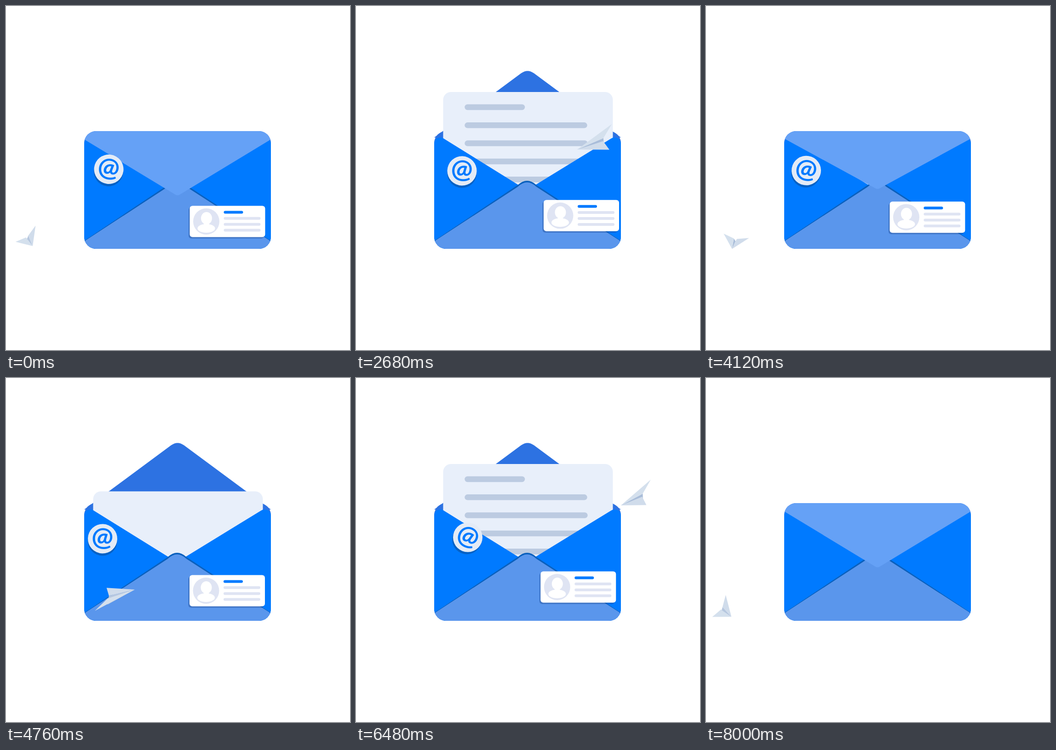
Animation of 748 by 748 pixels, one loop 8.04 s. Source, as an HTML page:

```html
<!DOCTYPE html>
<html lang="en">
<head>
<meta charset="utf-8">
<title>Mail</title>
<style>
  html, body { margin: 0; width: 100%; height: 100%; overflow: hidden; background: #fff; }
  svg { display: block; width: 100%; height: 100%; }
</style>
</head>
<body>
<svg viewBox="0 0 748 748">
  <defs>
    <clipPath id="body"><rect x="170" y="272" width="406" height="256" rx="26"/></clipPath>
    <clipPath id="portrait"><circle cx="36" cy="34" r="28.5"/></clipPath>
  </defs>
  <rect x="170" y="272" width="406" height="256" rx="26" fill="#2d72e2"/>
  <path id="flapUp" fill="#2d72e2"/>
  <g id="letter">
    <rect x="189.5" width="369" height="232" rx="17" fill="#e8effa"/>
    <g id="lines" stroke="#bccbe1" stroke-width="12.5" stroke-linecap="round"></g>
  </g>
  <g clip-path="url(#body)">
    <path fill="#007aff" d="M170 300Q170 287 182 286Q187 285 192 289L353 389L372 402L391 388.500L555 288Q560 285 565 286Q576 288 576 300V528H170Z"/>
    <path fill="#0a60bd" d="M168 512L352 389Q372 371 392 389L578 512Z"/>
    <path fill="#5a96ec" d="M168 513L352 393Q372 374 392 393L578 513V530H168Z"/>
    <path id="flapDown" fill="#65a1f6"/>
  </g>
  <g id="badges">
    <g id="stamp">
      <circle cy="5" r="32" fill="#0561c5"/>
      <circle r="32" fill="#e4ebf6"/>
      <text id="at" fill="#007aff">@</text>
    </g>
    <g id="card">
      <rect x="-2.5" y="3" width="164" height="68" rx="6" fill="#00286e" opacity=".3"/>
      <rect width="164" height="68" rx="6" fill="#fff"/>
      <circle cx="36" cy="34" r="28.5" fill="#dfe4f3"/>
      <g clip-path="url(#portrait)" fill="#fff">
        <ellipse cx="36.5" cy="27" rx="12" ry="13.5"/>
        <rect x="31" y="34" width="11" height="10"/>
        <ellipse cx="36" cy="49" rx="19" ry="9.5"/>
      </g>
      <rect x="74" y="11" width="42" height="6" rx="3" fill="#007aff"/>
      <path stroke="#dfe4f3" stroke-width="6" stroke-linecap="round" d="M77 27.300h74M77 40.200h74M77 53.100h74"/>
    </g>
  </g>
  <g id="plane">
    <path fill="#a9bdd9"/>
    <path fill="#b6c7df"/>
    <path fill="#d4e0ed"/>
    <path fill="#d0dceb"/>
  </g>
</svg>
<script>
const STEP = 40, LOOP = 8040, CYCLE = 100;
const $ = id => document.getElementById(id);
const clamp = x => Math.min(1, Math.max(0, x));
const ramp = (n, start, length) => clamp((n - start) / length);
const ease = x => (1 - Math.cos(Math.PI * x)) / 2;
const mix = (a, b, k) => a + (b - a) * k;

// Smooth periodic curve through keys of the form [time, ...values].
function follow(keys, period, n) {
  n = (n + period) % period;
  const count = keys.length;
  const key = i => keys[(i + count) % count];
  const time = i => key(i)[0] + period * Math.floor(i / count);
  let i = count - 1;
  while (i > 0 && keys[i][0] > n) i--;
  const span = time(i + 1) - time(i), u = (n - time(i)) / span;
  const slope = (j, v) => (key(j + 1)[v] - key(j - 1)[v]) / (time(j + 1) - time(j - 1));
  return key(i).slice(1).map((a, k) => {
    const v = k + 1, b = key(i + 1)[v];
    return a * (1 + 2 * u) * (1 - u) ** 2 + b * u * u * (3 - 2 * u)
      + span * (slope(i, v) * u * (1 - u) ** 2 - slope(i + 1, v) * u * u * (1 - u));
  });
}

// time, nose x, nose y, angle from heading to left wing
const flight = [
  [0, 58, 522, -99], [4, 63, 527, -95], [11, 160, 468, -60], [18, 280, 460, -47],
  [27, 467, 379, -97], [48, 688, 222, -85], [54, 655, 230, -60], [61, 576, 277, -55],
  [66, 481, 312, -64], [85, 123, 448, -130], [96, 51, 507, -102]
];
// time, x, y, angle
const stampDrift = [
  [0, 223.5, 355, 7], [27, 236.5, 360, 12], [66, 230.5, 358.5, 2],
  [85, 231.5, 366, 18], [118, 210, 349.5, 2], [161, 243, 346.5, 22]
];
// time, x, y
const cardDrift = [
  [0, 399.5, 434.5], [27, 400.3, 427], [66, 408, 421.8],
  [85, 401.3, 420.5], [118, 399, 428.5], [161, 401.3, 420.5]
];

const rows = [361, 496.5, 497.5, 497.5, 497.5].map((end, i) => {
  const el = document.createElementNS("http://www.w3.org/2000/svg", "line");
  const x = 242.5, y = 33 + 39.3 * i;
  for (const [name, value] of Object.entries({ x1: x, y1: y, y2: y })) el.setAttribute(name, value);
  $("lines").append(el);
  return { el, x, end, start: 18.4 + 4.15 * i };
});

// Centre the sign by its ink, not by its line box.
function centreSign() {
  const font = "700 56px Lato, sans-serif";
  const pen = document.createElement("canvas").getContext("2d");
  pen.font = font;
  const ink = pen.measureText("@");
  $("at").style.font = font;
  $("at").setAttribute("x", (ink.actualBoundingBoxLeft - ink.actualBoundingBoxRight) / 2);
  $("at").setAttribute("y", (ink.actualBoundingBoxAscent - ink.actualBoundingBoxDescent) / 2);
}

// The flap turns about the top edge: 1 is fully open, -1 is shut.
function drawFlap(n) {
  const fold = 2 * (ease(ramp(n, 0, 14)) - ease(ramp(n, 82.7, 15.4))) - 1;
  const up = fold > 0;
  const tip = 272 - fold * (up ? 136 : 141);
  const base = 272 + Math.abs(fold) * (up ? 14 : 18);
  const r = up ? 14 : 5;
  const shoulder = mix(tip, base, r / 203);
  const point = `L${373 - r} ${shoulder}Q373 ${tip} ${373 + r} ${shoulder}`;
  $("flapUp").setAttribute("d", up ? `M170 ${base}${point}L576 ${base}Z` : "");
  $("flapDown").setAttribute("d", up ? "" : `M576 272H170V${base}${point}L576 ${base}Z`);
}

function drawLetter(n) {
  const out = ease(ramp(n, 11.4, 16.5)) - ease(ramp(n, 70.4, 16.5));
  $("letter").setAttribute("transform", `translate(0 ${mix(278, 187, out)})`);
  for (const { el, x, end, start } of rows) {
    const k = ramp(n, start, 4);
    el.setAttribute("x2", mix(x, end, k));
    el.setAttribute("visibility", k > 0 ? "visible" : "hidden");
  }
}

// The plane points along its path and looks longer the faster it crosses the view.
function drawPlane(n) {
  const [x, y, spread] = follow(flight, CYCLE, n);
  const [x0, y0] = follow(flight, CYCLE, n - 0.1);
  const [x1, y1] = follow(flight, CYCLE, n + 0.1);
  const heading = Math.atan2(y1 - y0, x1 - x0);
  const speed = Math.hypot(x1 - x0, y1 - y0) / 0.2;
  const length = Math.min(78, 23 + 2.7 * speed);
  const wing = heading + spread * Math.PI / 180;
  const at = (back, side, drop = 0) => [
    x - back * length * Math.cos(heading) + side * 28 * Math.cos(wing),
    y - back * length * Math.sin(heading) + side * 28 * Math.sin(wing) + drop * length
  ].map(v => v.toFixed(2)).join(" ");
  const keel = at(0.8, 0, 0.2);
  const faces = [
    [at(0.78, -0.12), keel], [at(0.78, 0.12), keel],
    [at(1, -1), at(0.78, -0.12)], [at(1, 1), at(0.78, 0.12)]
  ];
  faces.forEach((face, i) =>
    $("plane").children[i].setAttribute("d", `M${at(0, 0)}L${face.join("L")}Z`));
}

function drawBadges(n) {
  const [x, y, angle] = follow(stampDrift, 2 * CYCLE, n);
  $("stamp").setAttribute("transform", `translate(${x} ${y}) rotate(${angle})`);
  $("card").setAttribute("transform", `translate(${follow(cardDrift, 2 * CYCLE, n).join(" ")})`);
  $("badges").setAttribute("visibility", n < 199 ? "visible" : "hidden");
}

function render(ms) {
  // The first pose is held for two steps.
  const n = Math.max(0, Math.floor((ms % LOOP) / STEP + 1e-6) - 1);
  const m = n % CYCLE;
  drawFlap(m);
  drawLetter(m);
  drawPlane(m);
  drawBadges(n);
}

const begin = performance.now();
function tick() {
  render(performance.now() - begin);
  requestAnimationFrame(tick);
}
centreSign();
render(0);
requestAnimationFrame(tick);
</script>
</body>
</html>
```
